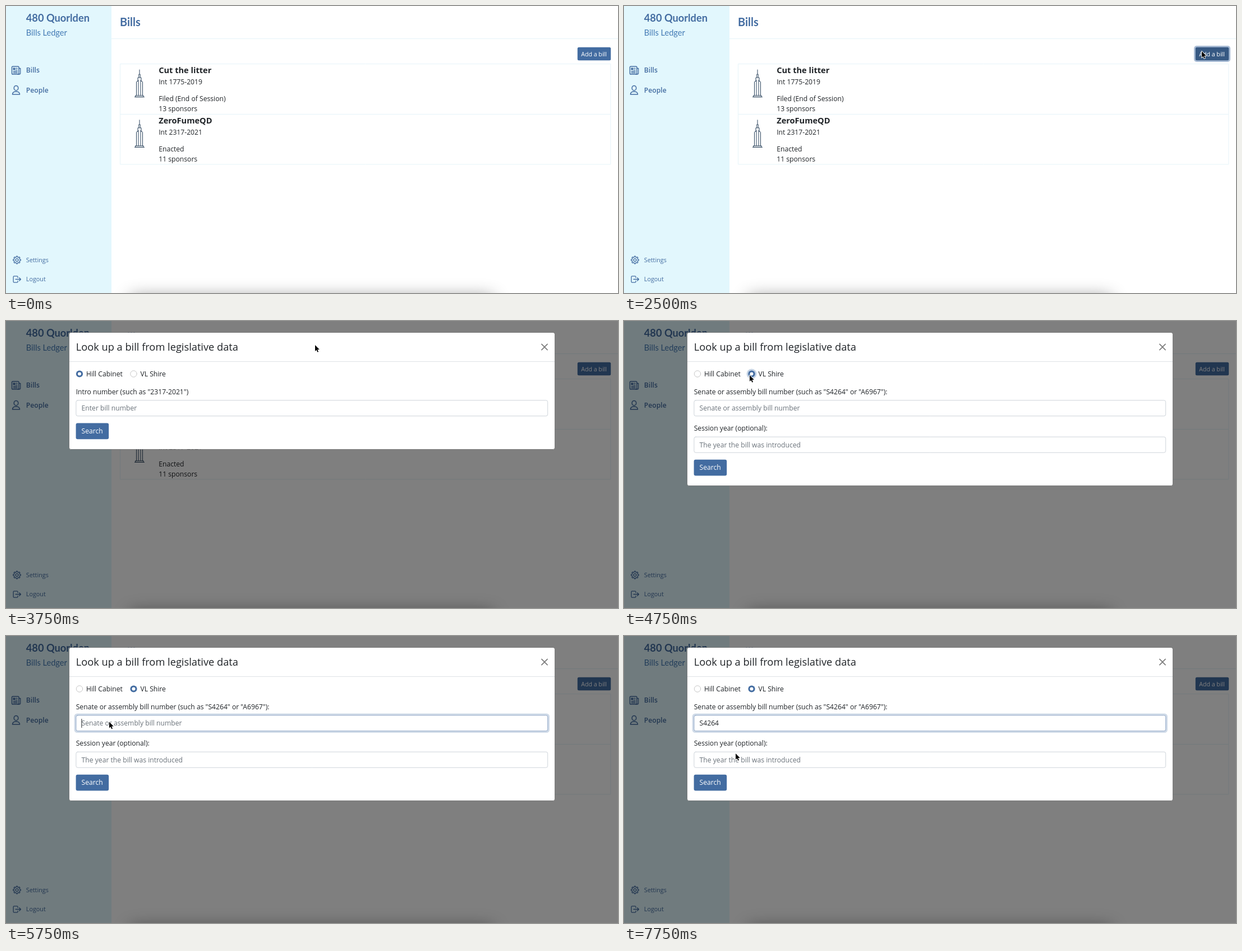
Recreate the animation shown at these times as an HTML page with a canvas. Size 1091 px wide and 513 px high, loop 8 s.

```html
<!DOCTYPE html>
<html lang="en">
<head>
<meta charset="utf-8">
<title>Bills</title>
<style>
  html, body { margin: 0; width: 100%; height: 100%; overflow: hidden; background: #fff; }
  canvas { display: block; width: 1091px; height: 513px; }
</style>
</head>
<body>
<canvas id="stage"></canvas>
<script>
const W = 1091, H = 513, LOOP = 8000, STEP = 250;
const BLUE = '#436ca1', DARK = '#375983', INK = '#1f2327', GREY = '#6a727a', NAVY = '#2b435c';
const RULE = '#e6f4f9';
const SANS = '"Open Sans", sans-serif', LATO = 'Lato, sans-serif';
const BASE = 12.15;

const canvas = document.getElementById('stage');
const ctx = canvas.getContext('2d');
const dpr = window.devicePixelRatio || 1;
canvas.width = Math.round(W * dpr);
canvas.height = Math.round(H * dpr);

function text(str, x, y, color = INK, size = BASE, weight = 400, family = SANS) {
  ctx.font = `${weight} ${size}px ${family}`;
  ctx.fillStyle = color;
  ctx.fillText(str, x, y);
  return ctx.measureText(str).width;
}

function box(x, y, w, h, r, fill, stroke, line = 1) {
  ctx.beginPath();
  ctx.roundRect(x, y, w, h, r);
  paint(fill, stroke, line);
}

function disc(x, y, r, fill, stroke, line = 1) {
  ctx.beginPath();
  ctx.arc(x, y, r, 0, Math.PI * 2);
  paint(fill, stroke, line);
}

function paint(fill, stroke, line) {
  if (fill) { ctx.fillStyle = fill; ctx.fill(); }
  if (stroke) { ctx.strokeStyle = stroke; ctx.lineWidth = line; ctx.stroke(); }
}

function draw(d, color, line = 1.3) {
  ctx.lineCap = ctx.lineJoin = 'round';
  ctx.strokeStyle = color;
  ctx.lineWidth = line;
  ctx.stroke(new Path2D(d));
}

function at(x, y, fn) {
  ctx.save();
  ctx.translate(x, y);
  fn();
  ctx.restore();
}

// ---- page ----

function tower() {
  draw('M0 .5V8M-1.2 14V8.5H1.2V14M-3 21V14.5H3V21M-5.5 46.5V22.5L-4.5 21H-3M5.5 46.5V22.5L4.5 21H3' +
       'M-2 46.5V19M2 46.5V19M-7 46.5H7V49H-7ZM-8.5 49.2H8.5', NAVY, 1);
}

function newsIcon() {
  box(-7.5, -7, 12.5, 14, 1.8, null, BLUE, 1.5);
  draw('M5 -3.5H7.7V4.8A2.2 2.2 0 0 1 5.5 7H3M-1 -3.6H2.3M-1 -.7H2.3M-4.8 2H2.3M-4.8 4.5H2.3', BLUE, 1.3);
  box(-5, -4.2, 2.8, 3.4, .4, BLUE, BLUE, .8);
}

function personIcon() {
  box(-3.7, -8, 7.4, 8.4, 3.7, null, BLUE, 1.5);
  draw('M-6.5 7.6C-6.5 3.6 -3.6 2.6 0 2.6S6.5 3.6 6.5 7.6Z', BLUE, 1.5);
}

function gearIcon() {
  ctx.beginPath();
  for (let i = 0; i <= 96; i++) {
    const a = i / 96 * Math.PI * 2;
    const r = 5.9 + .9 * Math.tanh(2.5 * Math.cos(8 * a));
    ctx.lineTo(r * Math.cos(a), r * Math.sin(a));
  }
  paint(null, BLUE, 1.3);
  disc(0, 0, 2.4, null, BLUE, 1.3);
}

function logoutIcon() {
  draw('M1.5 -3V-4.2A1.4 1.4 0 0 0 .1 -5.6H-5A1.4 1.4 0 0 0 -6.4 -4.2V4.2A1.4 1.4 0 0 0 -5 5.6H.1' +
       'A1.4 1.4 0 0 0 1.5 4.2V3M-2.5 0H6.8M4.2 -2.7L6.9 0L4.2 2.7', BLUE, 1.3);
}

function billRow(y, name, number, status, sponsors) {
  at(238, y + 10.5, tower);
  text(name, 272.2, y + 17, INK, 14.58, 700);
  text(number, 272.2, y + 36.7);
  text(status, 272.2, y + 67.3);
  text(sponsors, 272.2, y + 85.4);
}

function bottomShadow() {
  ctx.save();
  ctx.beginPath();
  ctx.rect(188, 0, W - 188, H);
  ctx.clip();
  ctx.shadowColor = 'rgba(0,0,0,.45)';
  ctx.shadowBlur = 30 * dpr;
  ctx.shadowOffsetY = -1000 * dpr;
  ctx.fillStyle = '#000';
  ctx.fillRect(222, 1520, 646, 90);
  ctx.restore();
}

function page(hover, focus) {
  ctx.fillStyle = '#fff';
  ctx.fillRect(0, 0, W, H);
  ctx.fillStyle = '#e2f7fd';
  ctx.fillRect(0, 0, 188, H);

  text('480 Quorlden', 35.8, 28, BLUE, 18.23, 700, LATO);
  text('Bills Ledger', 35.8, 53, '#447bb5', 14.58, 400, LATO);
  at(18, 115, newsIcon);
  at(18, 150.5, personIcon);
  at(19.5, 454, gearIcon);
  at(19.5, 488.5, logoutIcon);
  text('Bills', 35.8, 119.3, BLUE, BASE, 600);
  text('People', 35.8, 155, BLUE, BASE, 600);
  text('Settings', 35.8, 457.7, BLUE, 10.8);
  text('Logout', 35.8, 492, BLUE, 10.8);

  text('Bills', 203, 35.5, BLUE, 20, 700, LATO);
  ctx.fillStyle = RULE;
  ctx.fillRect(188, 58, W - 188, 1);

  box(203.5, 103.5, 874.3, 179.5, 0, null, RULE);
  ctx.fillStyle = RULE;
  ctx.fillRect(204, 193, 874, 1);
  billRow(103, 'Cut the litter', 'Int 1775-2019', 'Filed (End of Session)', '13 sponsors');
  billRow(192.8, 'ZeroFumeQD', 'Int 2317-2021', 'Enacted', '11 sponsors');

  if (focus) box(1016, 71, 65, 29, 5, '#a9bcd5');
  box(1018.8, 73.8, 59.4, 23.4, 2.5, hover ? DARK : BLUE);
  text('Add a bill', 1025.2, 89.7, '#fff', 10.63);

  bottomShadow();
}

// ---- dialog ----

function radio(x, label, checked, focus) {
  if (focus) disc(x, 94.5, 9, '#c5d3e4');
  if (checked) {
    disc(x, 94.5, 6.1, BLUE);
    disc(x, 94.5, 3, '#fff');
  } else {
    disc(x, 94.5, 5.7, '#fff', '#bfbfbf', .9);
  }
  text(label, x + 12, 98.7);
}

function field(y, value, hint, focus, caret) {
  if (focus) box(121.6, y - 3, 847.4, 34.6, 5.5, '#d0dbe8');
  box(124.9, y + .3, 840.8, 28, 3, '#fff', focus ? '#92a9c8' : '#ced4da');
  const w = value ? text(value, 134.6, y + 18.7) : 0;
  if (!value) text(hint, 134.6, y + 18.7, GREY);
  if (caret) {
    ctx.fillStyle = INK;
    ctx.fillRect(134.4 + w, y + 6.5, 1, 16);
  }
}

function searchButton(y) {
  box(124.6, y, 58.6, 28.8, 3, BLUE);
  text('Search', 134.6, y + 18.6, '#fff');
}

function dialog(s) {
  box(112.5, 20.5, 866, s.state ? 274 : 209, 3.6, '#fff', 'rgba(0,0,0,.35)');
  text('Look up a bill from legislative data', 124.7, 53, INK, 18.23, 500);
  draw('M954.9 41.4L965.1 51.6M965.1 41.4L954.9 51.6', '#7b7b7b', 1.7);
  ctx.fillStyle = '#dee2e6';
  ctx.fillRect(113, 72, 865, 1);

  radio(131, 'Hill Cabinet', !s.state, false);
  radio(227.5, 'VL Shire', s.state, s.radioFocus);
  if (s.state) {
    text('Senate or assembly bill number (such as "S4264" or "A6967"):', 124.7, 130.7);
    field(141.5, s.typed, 'Senate or assembly bill number', s.fieldFocus, s.caret);
    text('Session year (optional):', 124.7, 196);
    field(206.9, '', 'The year the bill was introduced');
    searchButton(247.8);
  } else {
    text('Intro number (such as "2317-2021")', 124.7, 130.7);
    field(141.5, '', 'Enter bill number');
    searchButton(182.5);
  }
}

// ---- pointer ----

const PATH = [
  [500, 774, 1], [1000, 940, 58], [1250, 1005, 79], [1500, 1032, 86], [1750, 1030, 81],
  [2750, 1030, 81], [3000, 1010, 79], [3750, 551, 43], [4000, 330, 88], [4250, 262, 95],
  [4500, 228, 99], [4750, 224, 97], [5000, 224, 97], [5250, 221, 104], [5500, 186, 151],
  [5750, 184, 153.5], [7500, 190, 182], [7750, 199, 210]
];

function pointer(t) {
  const i = PATH.findIndex(p => p[0] >= t);
  const b = PATH[i], a = PATH[Math.max(i - 1, 0)];
  const k = b === a ? 0 : (t - a[0]) / (b[0] - a[0]);
  at(a[1] + (b[1] - a[1]) * k, a[2] + (b[2] - a[2]) * k, () => {
    const arrow = new Path2D('M0 0V11L2.5 8.7L4.3 12.8L6 12L4.3 8.1H7.8Z');
    ctx.lineJoin = 'round';
    ctx.strokeStyle = '#fff';
    ctx.lineWidth = 1.8;
    ctx.stroke(arrow);
    ctx.fillStyle = '#000';
    ctx.fill(arrow);
  });
}

// ---- timeline ----

const TYPING = [[7250, 5], [7000, 4], [6750, 2], [6250, 1], [0, 0]];

function render(t) {
  ctx.setTransform(dpr, 0, 0, dpr, 0, 0);
  const open = t >= 2750;
  page(t >= 1750 && !open, t === 2500);
  if (open) {
    ctx.fillStyle = 'rgba(0,0,0,.5)';
    ctx.fillRect(0, 0, W, H);
    const count = TYPING.find(k => t >= k[0])[1];
    at(0, t < 3000 ? -6 : 0, () => dialog({
      state: t >= 4750,
      radioFocus: t >= 4750 && t < 5750,
      fieldFocus: t >= 5750,
      typed: 'S4264'.slice(0, count),
      caret: t >= 5750 && t < 7500
    }));
  }
  if (t >= 500 && t < 6250 || t >= 7500) pointer(t);
}

const start = performance.now();
function tick() {
  const t = (performance.now() - start) % LOOP;
  render(Math.floor(t / STEP) * STEP);
  requestAnimationFrame(tick);
}
tick();
</script>
</body>
</html>
```
